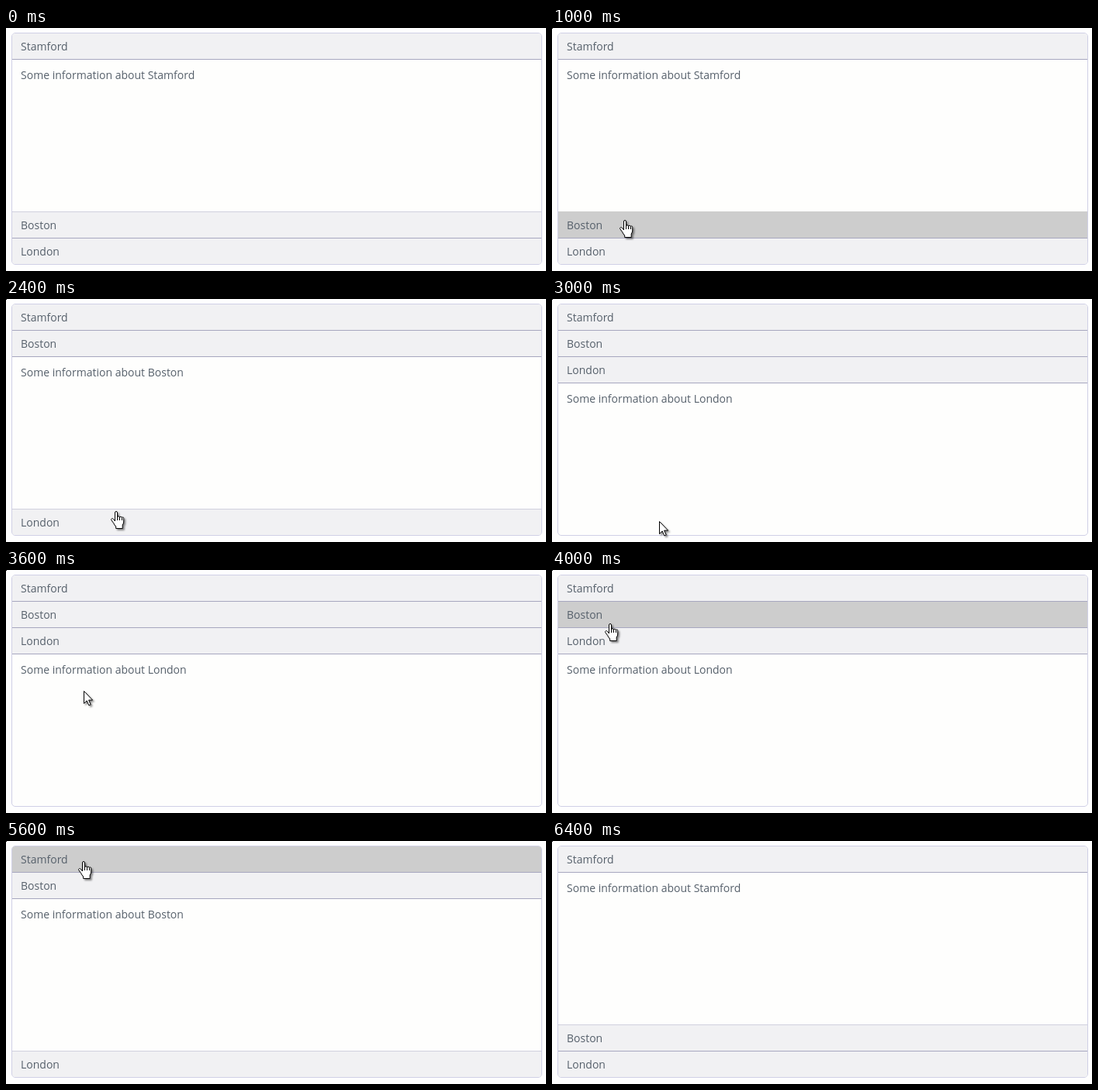
Recreate the animation shown at these times as an HTML page. Size 696 by 314 pixels, loop 8 s.

```html
<!DOCTYPE html>
<html lang="en">
<head>
<meta charset="utf-8">
<title>Accordion</title>
<style>
html, body { margin: 0; width: 100%; height: 100%; overflow: hidden; background: #fefefe; }
body { position: relative; font: 14px/33px "Open Sans", sans-serif; color: #56606b; }
#panel { position: absolute; left: 7px; top: 6px; width: 682px; height: 298px;
  border: 1px solid #d0d0e6; border-radius: 5px; overflow: hidden; background: #fefefd; }
.row, #info { position: absolute; left: 0; right: 0; height: 33px; padding-left: 11px; white-space: nowrap; }
.row { --fill: #f1f1f3; --edge: #d0d0de; background: var(--fill); border-bottom: 1px solid #a7a7bf; }
.row.below { box-shadow: 0 -1px var(--edge); }
.row.hover { --fill: #cdcdcd; --edge: #cdcdcd; }
#dot { position: absolute; left: 0; top: 0; width: 1px; height: 1px; background: #000; }
#cursor { position: absolute; left: 0; top: 0; overflow: visible; filter: drop-shadow(2px 2px 1px rgba(0,0,0,.45)); }
#cursor path { fill: #fff; stroke: #000; stroke-linejoin: round; }
</style>
</head>
<body>
<div id="panel"><div id="info"></div></div>
<div id="dot"></div>
<svg id="cursor" width="20" height="26">
  <path id="arrow" d="M.5.5v16l3.7-3.6 2.6 6 2.4-1-2.6-5.8h5z"/>
  <g id="hand" transform="translate(-7 0)">
    <path d="M5.5 13V2q0-1.5 1.5-1.5T8.5 2v6q0-1.3 1.5-1.3t1.5 1.5q0-1 1.4-1t1.4 1.5q.2-.8 1.2-.8t1.2 1.3V14q0 2-1.5 4v4.5h-8.5V20q-2-2-3-4.5L.8 11.7q-.6-1.5.6-2t2.6 1.3z"/>
    <path d="M8.5 8v4m3-4v4m3-3v3"/>
  </g>
</svg>
<script>
const LOOP = 8000, STEP = 200, ROW = 34, BODY = 197, TOP = 7;
const cities = ["Stamford", "Boston", "London"];
// The pointer reaches each stop at a time, holds there, then clicks the named row and moves on.
const stops = [
  { at: 200, x: 190, y: 130 },
  { at: 1000, x: 94, y: 248, hold: 400, opens: "Boston" },
  { at: 2400, x: 142, y: 274 },
  { at: 2600, x: 138, y: 287, hold: 400, opens: "London" },
  { at: 4000, x: 75, y: 69, hold: 400, opens: "Boston" },
  { at: 5600, x: 100, y: 26, hold: 200, opens: "Stamford" },
  { at: 6400, x: 130, y: 110 }
];
const leaves = stop => stop.at + (stop.hold || 0);
const mix = (a, b, k) => Math.round(a + (b - a) * k);

const $ = id => document.getElementById(id);
const show = (id, on) => $(id).style.display = on ? "" : "none";
const rows = cities.map(city => {
  const row = document.createElement("div");
  row.className = "row";
  row.textContent = city;
  return $("panel").appendChild(row);
});

function pointer(t) {
  const i = stops.findIndex(stop => stop.at > t);
  if (i < 1) return null;
  const a = stops[i - 1], b = stops[i];
  const k = Math.max(0, (t - leaves(a)) / (b.at - leaves(a)));
  return { x: mix(a.x, b.x, k), y: mix(a.y, b.y, k) };
}

function openSection(t) {
  const clicked = stops.filter(stop => stop.opens && leaves(stop) <= t).pop();
  return clicked ? cities.indexOf(clicked.opens) : 0;
}

function draw(t) {
  const open = openSection(t), spot = pointer(t);
  let over = false;
  rows.forEach((row, i) => {
    const top = ROW * i + (i > open ? BODY : 0);
    const depth = spot ? spot.y - TOP - top : -1;
    const inside = depth >= 0 && depth < ROW;
    over = over || inside;
    row.style.top = top + "px";
    row.classList.toggle("below", i === open + 1);
    row.classList.toggle("hover", inside && depth > 2);
  });
  $("info").style.top = ROW * open + 37 + "px";
  $("info").textContent = "Some information about " + cities[open];
  show("dot", t >= STEP);
  show("cursor", spot);
  show("hand", over);
  show("arrow", !over);
  if (spot) $("cursor").style.transform = `translate(${spot.x}px, ${spot.y}px)`;
}

const start = performance.now();
function tick() {
  const t = (performance.now() - start) % LOOP;
  draw(Math.floor(t / STEP) * STEP);
  requestAnimationFrame(tick);
}
tick();
</script>
</body>
</html>
```
